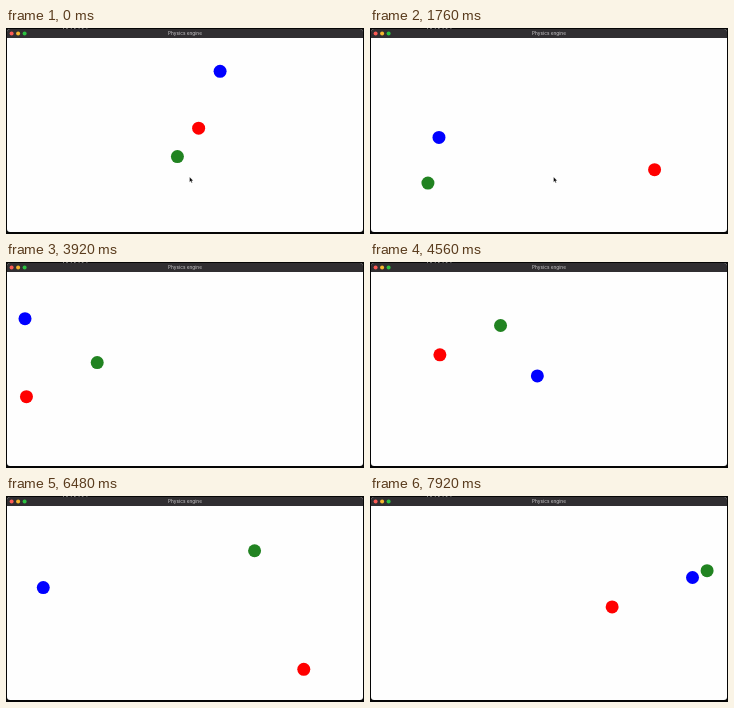
These frames come from a looping animation (358x206 px, 8 s). An HTML page:

```html
<!DOCTYPE html>
<html lang="en">
<head>
<meta charset="utf-8">
<title>Physics engine</title>
<style>
  html, body { margin: 0; width: 100%; height: 100%; overflow: hidden; background: #000; }
  svg { display: block; width: 100vw; height: 100vh; }
  text { font: 500 4.7px Inter, Roboto, sans-serif; fill: #b9b7ba; text-anchor: middle; }
</style>
</head>
<body>
<svg viewBox="0 0 358 206">
  <rect width="358" height="206" fill="#050505"/>
  <path d="M57 .4H82" stroke="#aaa" stroke-width=".8" stroke-dasharray="1 2.2 1.6 3"/>
  <path d="M1 201V4Q1 1 4 1H354Q357 1 357 4V201Q357 204 354 204H4Q1 204 1 201Z" fill="#fefefe"/>
  <path d="M1 10V4Q1 1 4 1H354Q357 1 357 4V10Z" fill="#302e31"/>
  <circle cx="5.6" cy="5.5" r="2" fill="#fc5b55"/>
  <circle cx="12.1" cy="5.5" r="2" fill="#f5b62e"/>
  <circle cx="18.6" cy="5.5" r="2" fill="#2bc241"/>
  <text x="179" y="7.2">Physics engine</text>
  <g id="balls"></g>
  <path id="cursor" d="M183.6 149V154.2L184.8 153.1L185.6 154.9L186.4 154.5L185.6 152.8H187.2Z"
        fill="#000" stroke="#fff" stroke-width=".3"/>
</svg>
<script>
const LOOP = 8, STEP = 0.08, GRAVITY = 634;
const LEFT = 7, RIGHT = 350, TOP = 16.5, FLOOR = 197;
const START = { t: -0.11, x: 178.5, y: 75 };
const CURSOR_END = 1.84;

// Contact times in seconds: side walls (alternating), and floor "f" / ceiling "c".
const balls = [
  { color: "#f00", first: RIGHT, walls: [1.225, 4.03, 6.92, 10.1],
    ends: "ffffffff", hits: [0.276, 1.605, 2.885, 4.11, 5.29, 6.405, 7.475, 8.53] },
  { color: "#00f", first: RIGHT, walls: [0.42, 1.545, 2.735, 3.963, 5.24, 6.6, 8.035],
    ends: "cfcffffff", hits: [0.126, 0.67, 1.318, 1.97, 3.41, 4.788, 6.107, 7.372, 8.585] },
  { color: "#218321", first: LEFT, walls: [2.55, 8.13],
    ends: "fcfcfcfcffff",
    hits: [0.122, 0.52, 0.93, 1.38, 1.842, 2.355, 2.89, 3.515, 4.155, 5.6, 6.99, 8.335] }
];

const group = document.getElementById("balls");
const cursor = document.getElementById("cursor");

for (const b of balls) {
  b.xs = [[START.t, START.x], ...b.walls.map((t, i) =>
    [t, i % 2 ? LEFT + RIGHT - b.first : b.first])];
  b.ys = [[START.t, START.y], ...b.hits.map((t, i) =>
    [t, b.ends[i] === "f" ? FLOOR : TOP])];
  b.node = document.createElementNS("http://www.w3.org/2000/svg", "circle");
  b.node.setAttribute("r", 6.5);
  b.node.setAttribute("fill", b.color);
  group.append(b.node);
}

// Position on the free-flight arc between two contacts.
function flight(keys, t, g) {
  const i = keys.findIndex(k => k[0] > t);
  const [t0, p0] = keys[i - 1], [t1, p1] = keys[i];
  return p0 + (p1 - p0) * (t - t0) / (t1 - t0) - g / 2 * (t - t0) * (t1 - t);
}

function draw(t) {
  for (const b of balls) {
    b.node.setAttribute("cx", flight(b.xs, t, 0).toFixed(2));
    b.node.setAttribute("cy", flight(b.ys, t, GRAVITY).toFixed(2));
  }
  cursor.style.display = t < CURSOR_END ? "" : "none";
}

const begin = performance.now();
function tick() {
  const t = (performance.now() - begin) / 1000 % LOOP;
  draw(Math.floor(t / STEP + 1e-6) * STEP);
  requestAnimationFrame(tick);
}
draw(0);
requestAnimationFrame(tick);
</script>
</body>
</html>
```
